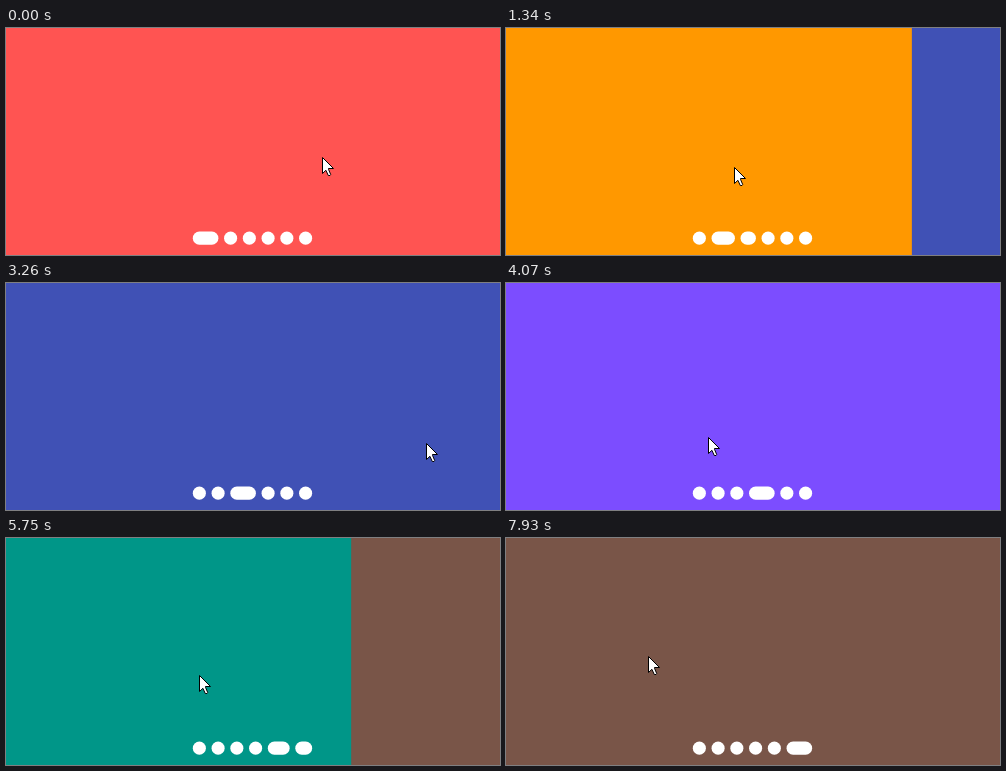
These frames come from a looping animation (494 px wide and 227 px high, 8000 ms). An HTML page with a canvas:

```html
<!DOCTYPE html>
<html lang="en">
<head>
<meta charset="utf-8">
<title>Pager indicator</title>
<style>
  html, body { margin: 0; width: 100%; height: 100%; overflow: hidden; }
  canvas { display: block; }
</style>
</head>
<body>
<canvas id="stage" width="494" height="227"></canvas>
<script>
const W = 494, H = 227, LOOP = 8000;
const ctx = document.getElementById('stage').getContext('2d');
const COLORS = ['#ff5452', '#ff9800', '#4051b5', '#7c4dff', '#009688', '#795548'];
const LAST = COLORS.length - 1;

// The screen refreshes at a slow, even pace.
const PACE = 138, PHASE = 96;

// Each gesture moves the pointer from its home to `reach`, then on to the next home.
// A swipe turns the page; a peek drags it and lets it go back; a pull meets the end.
const gesture = (kind, at, x, y, length = 950, reach = 33) => ({ kind, at, x, y, length, reach });
const GESTURES = [
  gesture('swipe', 90, 316, 129, 850),
  gesture('peek', 1174, 316, 135),
  gesture('swipe', 2200, 379, 147),
  gesture('swipe', 3280, 421, 160),
  gesture('swipe', 4386, 398, 154),
  gesture('swipe', 5450, 390, 149, 680),
  gesture('pull', 6290, 382, 128, 950, 146),
  gesture('peek', 7265, 146, 137, 555, 403)
];
const END = { x: 142, y: 118 };
const OUT = .458, SETTLE = .66;

const clamp = (v, lo, hi) => Math.min(hi, Math.max(lo, v));
const mix = (a, b, k) => a + (b - a) * k;
const ease = u => (1 - Math.cos(Math.PI * clamp(u, 0, 1))) / 2;

function stateAt(t) {
  const current = Math.max(0, GESTURES.findLastIndex(g => g.at <= t));
  const g = GESTURES[current], next = GESTURES[current + 1] || END;
  const u = (t - g.at) / g.length;
  const out = ease(u / OUT), back = ease((u - OUT) / (1 - OUT));
  const x = mix(mix(g.x, g.reach, out), next.x, back);
  const y = mix(g.y, next.y, out);

  let page = GESTURES.slice(0, current).filter(d => d.kind === 'swipe').length;
  if (g.kind === 'swipe') page += ease(u / SETTLE);
  if (g.kind === 'peek') {
    const drag = (g.x - x) / W;
    if (drag * (g.x - g.reach) > 0) page += drag;
  }
  return { x, y, page: clamp(page, 0, LAST), glow: g.kind === 'pull' ? out : 0 };
}

function drawPages(page) {
  COLORS.forEach((color, i) => {
    ctx.fillStyle = color;
    ctx.fillRect((i - page) * W, 0, W * COLORS.length, H);
  });
}

function drawGlow(strength) {
  if (strength <= 0) return;
  ctx.fillStyle = `rgba(98, 80, 115, ${.42 * strength})`;
  ctx.beginPath();
  ctx.arc(846 - 20 * strength, 105, 352, 0, Math.PI * 2);
  ctx.fill();
}

function drawDots(page) {
  const size = 12.5, gap = 6.25, bleed = .3;
  let x = 187.1;
  ctx.fillStyle = '#fff';
  COLORS.forEach((_, i) => {
    const w = size * (1 + Math.max(0, 1 - Math.abs(i - page)));
    ctx.beginPath();
    ctx.roundRect(x - bleed, 203.9 - bleed, w + 2 * bleed, size + 2 * bleed, size / 2 + bleed);
    ctx.fill();
    x += w + gap;
  });
}

const arrow = new Path2D('M.5 .5V16.5L3.9 13.3L6.3 18.5H8L8.7 17.5L6.5 12.3V11.5H11.5Z');

function drawPointer(x, y) {
  ctx.save();
  ctx.translate(Math.round(x), Math.round(y));
  ctx.fillStyle = '#fff';
  ctx.strokeStyle = '#000';
  ctx.fill(arrow);
  ctx.stroke(arrow);
  ctx.restore();
}

function render(time) {
  const t = Math.floor((time - PHASE) / PACE) * PACE + PHASE;
  const { x, y, page, glow } = stateAt(t);
  drawPages(page);
  drawGlow(glow);
  drawDots(page);
  drawPointer(x, y);
}

const begin = performance.now();
function loop() {
  render((performance.now() - begin) % LOOP);
  requestAnimationFrame(loop);
}
loop();
</script>
</body>
</html>
```
